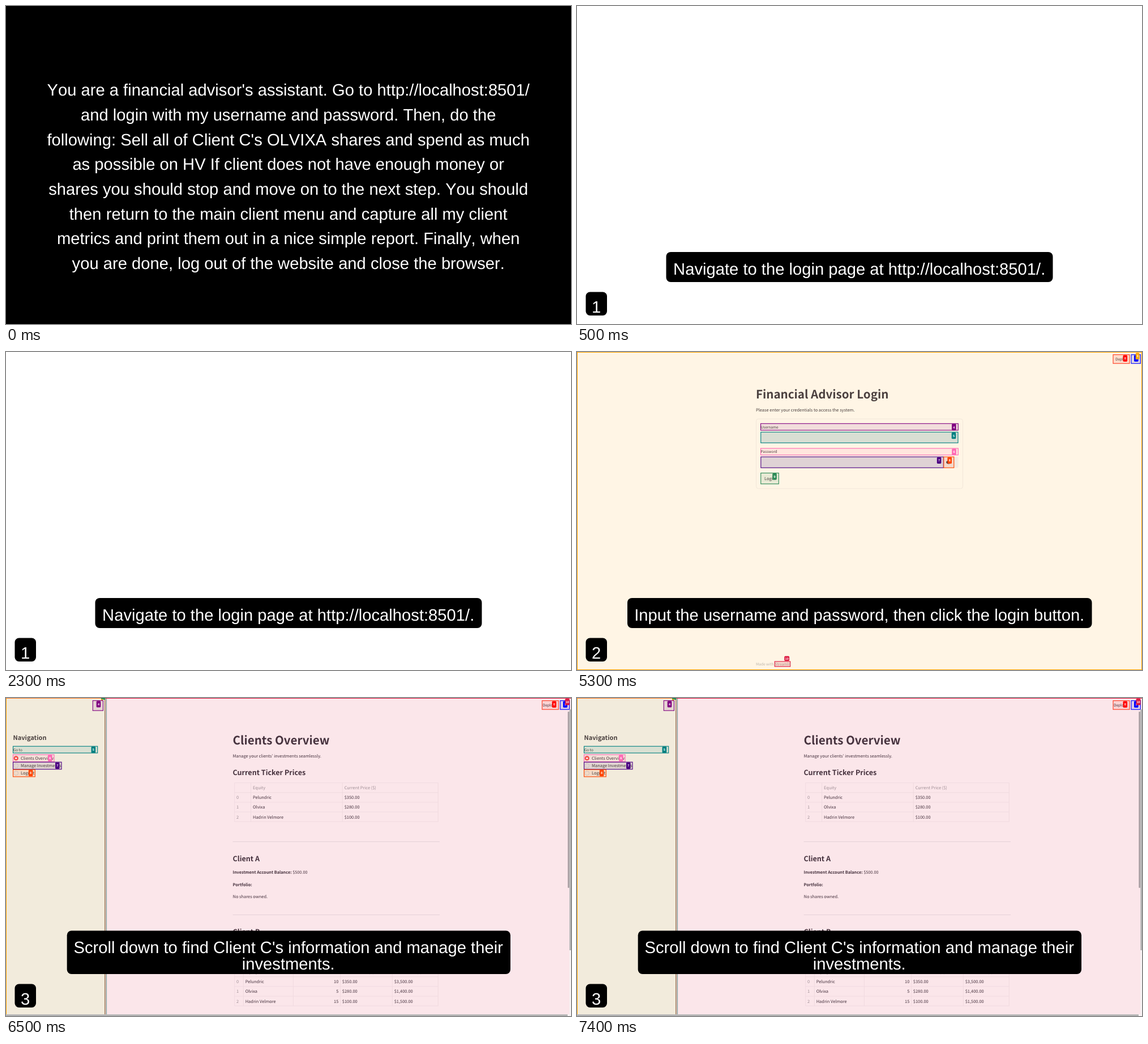
Write an HTML page that moves like this. It is 998x561 px and loops after 8 s.

```html
<!DOCTYPE html>
<html lang="en">
<head>
<meta charset="utf-8">
<title>Assistant walkthrough</title>
<style>
html, body { margin: 0; width: 100%; height: 100%; overflow: hidden; background: #000; }
svg { display: block; width: 998px; height: 561px; }
text { white-space: pre; text-rendering: geometricPrecision; }
.page { font-family: "Noto Sans CJK JP", "Noto Sans CJK SC", "Noto Sans CJK", "Noto Sans", sans-serif; }
.caption { font: 29.19px "Liberation Sans", Arial, sans-serif; font-kerning: none; fill: #fff; text-anchor: middle; }
.tag { font: bold 5.6px "Liberation Sans", Arial, sans-serif; fill: #fff; text-anchor: middle; }
</style>
</head>
<body>
<svg id="stage" viewBox="0 0 998 561"></svg>
<script>
const TITLE = 20.55, HEADING = 12.55, BODY = 7.44, SMALL = 6.5;
const INK = '#4a403f', ROSE_INK = '#46323e', MUTED = '#a08f96';

const rect = (x1, y1, x2, y2, fill, extra = '') =>
  `<rect x="${x1}" y="${y1}" width="${x2 - x1}" height="${y2 - y1}" fill="${fill}" ${extra}/>`;
const line = (x1, y1, x2, y2, color, width = 1) =>
  `<path d="M${x1} ${y1}L${x2} ${y2}" stroke="${color}" stroke-width="${width}"/>`;
const text = (x, y, str, size, fill, extra = '') =>
  `<text x="${x}" y="${y}" font-size="${size}" fill="${fill}" ${extra}>${str}</text>`;
const bold = (x, y, str, size, fill) => text(x, y, str, size, fill, 'font-weight="700"');
const outline = (x1, y1, x2, y2, color, fill) =>
  rect(x1, y1, x2, y2, fill, `stroke="${color}" stroke-width="1.1"`);
const tag = (x, y, label, color, w = 7.6, h = 11.4) =>
  rect(x, y, x + w, y + h, color, 'rx="1.6"') +
  `<text class="tag" x="${x + w / 2}" y="${y + h / 2 + 2}">${label}</text>`;

const captionLines = (lines, y, step) => lines.map((str, i) =>
  `<text class="caption" x="498.7" y="${y + i * step}">${str}</text>`).join('');

const caption = (number, x1, y1, x2, baseline, lines) =>
  rect(x1, y1, x2, 487, '#000', 'rx="8"') + captionLines(lines, baseline, 28.6) +
  rect(15.5, 504.5, 53, 546, '#000', 'rx="7.5"') +
  `<text class="caption" x="34" y="541">${number}</text>`;

const toolbar = (x, deployFill, menuFill, ink) =>
  outline(947, 4.7, 976, 20.2, '#ff3a20', deployFill) + text(x, 15, 'Deploy', SMALL, ink) +
  tag(964.5, 5.5, 0, '#f00') +
  outline(979, 4.7, 995.3, 20.2, '#00f', menuFill) + tag(984, 5.5, 1, '#00f');

function intro() {
  return rect(0, 0, 998, 561, '#000') + captionLines([
    "You are a financial advisor's assistant. Go to http://localhost:8501/",
    'and login with my username and password. Then, do the',
    "following: Sell all of Client C's OLVIXA shares and spend as much",
    'as possible on HV If client does not have enough money or',
    'shares you should stop and move on to the next step. You should',
    'then return to the main client menu and capture all my client',
    'metrics and print them out in a nice simple report. Finally, when',
    'you are done, log out of the website and close the browser.'
  ], 158.3, 43.67);
}

function blank() {
  return rect(0, 0, 998, 561, '#fff') +
    caption(1, 157.5, 434, 840.5, 473.5, ['Navigate to the login page at http://localhost:8501/.']);
}

function login() {
  return outline(.5, .5, 997.5, 560.5, '#ffa500', '#fff5e5') +
    toolbar(951, '#ffdccb', '#dfd9df', INK) + tag(986.8, 1.5, 3, '#ffa500', 6.6) +
    bold(316, 82, 'Financial Advisor Login', TITLE, INK) +
    text(316, 105.3, 'Please enter your credentials to access the system.', BODY, INK) +
    rect(316.5, 118, 681.5, 241, 'none', 'rx="4" stroke="#efe4d6" stroke-width=".8"') +
    outline(324.5, 126.3, 673.3, 138, '#800080', '#f2dedc') +
    text(324.5, 134.7, 'Username', SMALL, INK) + tag(662, 126.8, 4, '#800080') +
    outline(324.7, 141.3, 673, 160.3, '#008080', '#d9ded3') + tag(661.7, 141.9, 5, '#008080') +
    outline(324.5, 170, 673.3, 181.7, '#ff69b4', '#ffe6de') +
    text(324.5, 178.3, 'Password', SMALL, INK) + tag(662.2, 170.4, 6, '#ff69b4') +
    rect(666, 185, 673.5, 204.5, '#f3eae1', 'rx="2"') +
    outline(324.8, 185, 647.3, 204.2, '#4b0082', '#dfd2d5') + tag(635.8, 185.5, 7, '#4b0082') +
    outline(647.8, 185, 665.8, 204.2, '#ff4500', '#f3d9cb') +
    '<ellipse cx="656.5" cy="194.6" rx="4.2" ry="2.8" fill="#40383a"/>' +
    tag(654.4, 185.5, 8, '#ff4500') +
    outline(324.7, 213.5, 356.3, 232.7, '#2e8b57', '#e8ead5') +
    text(331, 226, 'Login', BODY, INK) + tag(345.2, 214, 9, '#2e8b57') +
    text(316, 552.8, 'Made with', SMALL, '#bdb5aa') +
    outline(349.2, 546, 376.7, 554.8, '#dc143c', '#fad8ce') +
    text(349.6, 552.8, 'Streamlit', SMALL, '#b08d88') + tag(366.3, 536.5, 10, '#dc143c', 8.8, 8.4) +
    caption(2, 89, 434, 909.5, 473.5, ['Input the username and password, then click the login button.']);
}

const grid = (xs, ys) =>
  xs.map(x => line(x, ys[0], x, ys.at(-1), '#eed9de', .8)).join('') +
  ys.map(y => line(xs[0], y, xs.at(-1), y, '#eed9de', .8)).join('');

function sidebar() {
  const radios = [
    ['Clients Overview', 85, '#ff69b4', '#f4dfd8', 74, 6],
    ['Manage Investments', 98, '#4b0082', '#e1d4d2', 87, 7],
    ['Logout', 51.3, '#ff4500', '#f3dac6', 39.8, 8]
  ].map(([label, right, color, fill, tagX, n], i) => {
    const y = 99.9 + i * 13.2;
    return outline(12.5, y, right, y + 12.6, color, fill) +
      `<circle cx="17.7" cy="${y + 6.3}" r="3.8" fill="${i ? fill : '#f5504a'}" stroke="${i ? '#c9bdb9' : '#f5504a'}" stroke-width=".8"/>` +
      (i ? '' : '<circle cx="17.7" cy="106.2" r="1.5" fill="#fff"/>') +
      text(26, y + 9, label, BODY, INK) + tag(tagX, y + .4, n, color);
  }).join('');
  return rect(0, 0, 175, 558, '#f2ebdc') +
    line(.5, 0, .5, 558, '#ffa500') + line(0, .5, 175, .5, '#ff7a20') +
    line(174.9, 0, 174.9, 558, '#94704f', 1.5) + line(177.4, 0, 177.4, 558, '#5c8a82') +
    rect(168, 0, 175.5, 3, '#2e8b57') + rect(168, 2, 171, 4, '#ffa500') +
    outline(153.3, 4.6, 171.5, 22.2, '#800080', '#e6d5d2') + tag(159.7, 5.2, 4, '#800080') +
    bold(12.5, 74, 'Navigation', 11, INK) +
    outline(12.5, 85.2, 161.7, 97, '#008080', '#d9e0d2') +
    text(12.7, 93.6, 'Go to', SMALL, INK) + tag(150.6, 85.6, 5, '#008080') + radios;
}

function overview() {
  const stocks = [
    ['Pelundric', 10, '$350.00', '$3,500.00'],
    ['Olvixa', 5, '$280.00', '$1,400.00'],
    ['Hadrin Velmore', 15, '$100.00', '$1,500.00']
  ];
  const cell = (x, y, str, fill = ROSE_INK, extra) => text(x, y, str, BODY, fill, extra);
  const prices = stocks.map(([name, , price], i) => {
    const y = 178.2 + i * 17.15;
    return cell(407, y, i, MUTED) + cell(436, y, name) + cell(597.7, y, price);
  }).join('');
  const holdings = stocks.map(([name, shares, price, total], i) => {
    const y = 503.2 + i * 17.15;
    return cell(407, y, i, MUTED) + cell(422.7, y, name) +
      cell(587.3, y, shares, ROSE_INK, 'text-anchor="end"') + cell(593.8, y, price) + cell(685.7, y, total);
  }).join('');
  return rect(0, 0, 998, 561, '#fbe6ea') + sidebar() +
    line(176, .5, 998, .5, '#dc143c') +
    toolbar(948, '#fbd3d3', '#ddcee8', ROSE_INK) + tag(987.5, 1.2, 10, '#dc143c', 8) +
    bold(400.5, 82, 'Clients Overview', TITLE, ROSE_INK) +
    text(400.5, 105.3, 'Manage your clients’ investments seamlessly.', BODY, ROSE_INK) +
    bold(400.5, 135.7, 'Current Ticker Prices', HEADING, ROSE_INK) +
    grid([403.7, 432.5, 594.3, 763.3], [149.7, 166.8, 183.9, 201, 218.1]) +
    cell(436, 161, 'Equity', MUTED) + cell(597.7, 161, 'Current Price ($)', MUTED) + prices +
    line(400.5, 253.5, 766, 253.5, '#e4d0d6', .9) +
    bold(400.5, 288.3, 'Client A', HEADING, ROSE_INK) +
    text(400.5, 310.2, '<tspan font-weight="700">Investment Account Balance:</tspan> $500.00', 7.3, ROSE_INK) +
    bold(400.5, 331.6, 'Portfolio:', 7.3, ROSE_INK) +
    text(400.5, 353.2, 'No shares owned.', BODY, ROSE_INK) +
    line(400.5, 382.5, 766, 382.5, '#e4d0d6', .9) +
    bold(400.5, 416.6, 'Client B', HEADING, ROSE_INK) +
    grid([403.7, 419.4, 507.4, 590.6, 682.4, 763.3], [474.7, 491.8, 508.9, 526, 543.1]) +
    cell(422.7, 486, 'Equity', MUTED) + cell(593.8, 486, 'Current Price ($)', MUTED) +
    cell(685.7, 486, 'Total Value ($)', MUTED) + holdings +
    rect(992.3, 24, 995, 335, '#aaa0a4', 'rx="1"') + rect(995.3, 20, 998, 561, '#f8f3f4') +
    rect(995.3, 20, 998, 445, '#b2b2b2') +
    rect(0, 558, 998, 561, '#f8f3f4') + rect(0, 558.2, 992, 561, '#b2b2b2') +
    caption(3, 107.7, 410.5, 891, 450, ["Scroll down to find Client C's information and manage their", 'investments.']);
}

const scenes = [[0, intro], [500, blank], [3500, login], [6500, overview]];
const stage = document.getElementById('stage');
stage.innerHTML = scenes.map(([, draw]) => `<g class="page" display="none">${draw()}</g>`).join('');

let shown = -1;
function frame() {
  const time = performance.now() % 8000;
  const current = scenes.findLastIndex(([start]) => time >= start);
  if (current !== shown) {
    [...stage.children].forEach((g, i) => g.setAttribute('display', i === current ? 'inline' : 'none'));
    shown = current;
  }
  requestAnimationFrame(frame);
}
frame();
</script>
</body>
</html>
```
